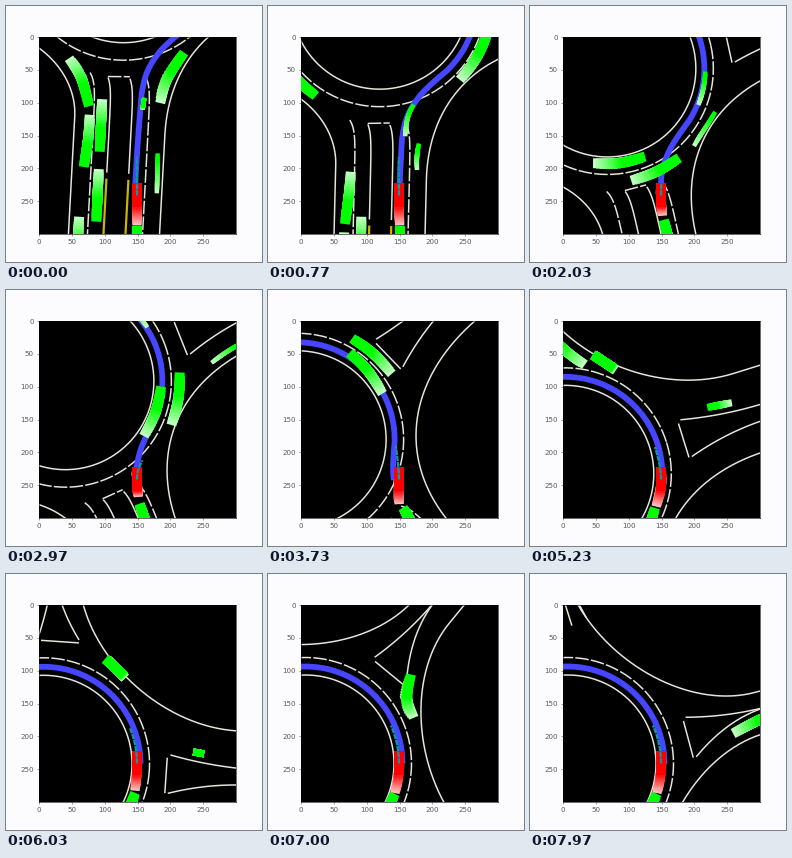
Animation, 256 px wide and 256 px high, one loop 8 s. Source, as a matplotlib script:

```python
import numpy as np
import matplotlib.pyplot as plt
from matplotlib.animation import FuncAnimation
from matplotlib.collections import PolyCollection

FRAMES, LOOP = 240, 8000
DT = LOOP / FRAMES / 1000
DPI = 51.2
PT = 72 / DPI                      # points per pixel
EGO = np.array([131.0, 189.5])     # fixed place of the red car, in pixels
AGES = np.arange(9, -1, -1) * DT   # ages of the ghosts in each trail
CAR, BIKE = (25, 10), (10, 4.5)
CLOCK = np.arange(-2, 9.5, 0.005)


# Geometry: the map is in pixels around the roundabout, south is +y.

def polar(deg, r):
    a = np.radians(deg)
    return np.stack([r * np.cos(a), r * np.sin(a)], -1)


def turn(p, deg):
    a = np.radians(deg)
    c, s = np.cos(a), np.sin(a)
    return np.stack([p[..., 0] * c - p[..., 1] * s,
                     p[..., 0] * s + p[..., 1] * c], -1)


def lengths(p):
    return np.r_[0, np.cumsum(np.hypot(*np.diff(p, axis=0).T))]


def smooth(*parts):
    """Cubic curve through the given points, sampled at each pixel."""
    p = np.vstack(parts).astype(float)
    d = lengths(p)
    slope = np.gradient(p, d, axis=0)
    s = np.arange(0, d[-1], 1.0)
    i = np.searchsorted(d, s, side="right") - 1
    h = (d[i + 1] - d[i])[:, None]
    u = (s - d[i])[:, None] / h
    return ((1 + 2 * u) * (1 - u) ** 2 * p[i] + u * (1 - u) ** 2 * h * slope[i]
            + u * u * (3 - 2 * u) * p[i + 1] + u * u * (u - 1) * h * slope[i + 1])


def ring(r, start, stop):
    return polar(np.arange(start, stop, -8), r)


def leave(deg):
    """Way out of the ring into the exit lane of an arm."""
    return polar(deg + np.array([20, 8, 2, 1]), np.array([119, 150, 200, 330]))


# Motion: a track gives the place, a speed profile gives the distance.

def travelled(times, speeds):
    return np.cumsum(np.interp(CLOCK, times, speeds)) * (CLOCK[1] - CLOCK[0])


def follow(track, s):
    d = lengths(track)

    def place(q):
        return np.stack([np.interp(q, d, track[:, k]) for k in (0, 1)], -1)
    s = np.clip(s, 5, d[-1] - 5)
    ahead = place(s + 4) - place(s - 4)
    return place(s), np.degrees(np.arctan2(ahead[..., 1], ahead[..., 0]))


def mover(track, spot, t0=0, times=(0,), speeds=(92,)):
    """Path of a vehicle that passes the spot at time t0."""
    run = travelled(times, speeds)
    nearest = np.argmin(np.hypot(*(track - spot).T))
    s0 = lengths(track)[nearest] - np.interp(t0, CLOCK, run)

    def path(t, lag=0):
        return follow(track, s0 + np.interp(t, CLOCK, run) - lag)
    return path


PACE = ((0, 1.25, 2, 3, 3.73, 4.47, 5.2, 6.03, 6.5),
        (60, 60, 20, 18, 50, 56, 51, 51, 60))
ego_path = mover(
    smooth([(35, 400), (26.4, 240), (24, 194), (25.6, 134), (33, 112),
            (46.5, 97.7), (70.2, 66.9)], polar(22, 96), ring(93.5, 0, -190)),
    (26.4, 240), 0, *PACE)


def follower(t):
    return ego_path(t, 34 + 0.15 * np.interp(t, *PACE))


south_out = smooth(ring(114, 200, 120), [(-38, 122), (-29, 145), (-30, 240),
                                         (-31, 420)])
south_mid = smooth([(-14, 60), (-12, 420)])
right_turn = smooth([(45, 430), (45, 202), (42, 146), (48, 124), (66, 97)],
                    polar(35, 116), leave(6))
right_lane = smooth([(47, 300), (45, 170), (49, 126), (59, 106)],
                    ring(112, 45, -140), leave(-170))
inner = smooth(ring(95, 260, 30), polar(-8, 99), polar(-45, 105), leave(-90))
outer = smooth(ring(114, 260, -45), polar(-58, 120), leave(-90))
bike_lane = smooth([(28, 300), (28, 147), (33, 110), (52, 84)],
                   ring(98, 40, -50), leave(-90))
east_in = smooth([(340, -6), (200, -16.5), (140, -23)])

TRAFFIC = [(mover(south_out, (-29, y)), CAR) for y in (141, 202, 305)]
TRAFFIC += [(mover(south_mid, (-12, y)), CAR) for y in (186, 256)]
TRAFFIC += [
    (mover(right_lane, (59, 106), speeds=(105,)), CAR),
    (mover(inner, polar(85, 95), 2.03, speeds=(93,)), CAR),
    (mover(outer, polar(68.5, 114), 2.03, (3.73, 4.47, 5, 6.03, 7.2),
           (95, 70, 8, 10, 90)), CAR),
    (mover(bike_lane, (28, 147), 0, (0, 0.6), (8, 81)), BIKE),
    (mover(right_turn, (45, 202), 0, (0, 0.77, 2.03, 2.6),
           (100, 45, 110, 90)), BIKE),
    (mover(east_in, (200, -16.5), 4.47, (4.9, 5.6), (60, 0)), (11, 7)),
    (follower, CAR),
]


# Road markings

WHITE, YELLOW = "#e6e6dc", "#c8b800"
SOLID, DASH = "-", (0, (9, 1.5))


def curb(p0, corner, p1, k):
    """Rounded corner between two arms, with straight ends."""
    p0, c, p1 = (np.array(p, float) for p in (p0, corner, p1))
    u = np.linspace(0, 1, 40)[:, None]
    q0, q1 = p0 + k * (c - p0), p1 + k * (c - p1)
    arc = ((1 - u) ** 3 * p0 + 3 * u * (1 - u) ** 2 * q0
           + 3 * u * u * (1 - u) * q1 + u ** 3 * p1)
    ends = [p + 150 * (p - c) / np.hypot(*(p - c)) for p in (p0, p1)]
    return np.vstack([ends[0], arc, ends[1]])


def splitter(deg, left, right, tips):
    """Island of an arm: a give-way line and two edges that close in."""
    u = np.linspace(0, 1, 20)
    edges = [np.stack([126 + 84 * u, tip + (y - tip) * (1 - u) ** 2], -1)
             for y, tip in zip((left, right), tips)]
    gate = np.array([(123, left + 3), (123, right)])
    return [turn(p, deg) for p in (gate, *edges)]


def lane_line(x, y0, y1):
    y = np.linspace(y0, y1, 60)
    return np.stack([x - 6 * np.exp((120 - y) / 9), y], -1)


LINES = [(polar(np.linspace(0, 360, 240), 88.5), WHITE, SOLID),
         (polar(np.linspace(0, 360, 240), 106), WHITE, DASH)]
solid = [
    curb((51, 178), (51, 30), (210, 38), 0.6),
    curb((190, -46), (22, -46), (22, -200), 0.5),
    curb((-20, -200), (-20, -46), (-190, -46), 0.5),
    curb((-100, 88), (-40, 110), (-40, 165), 0.6),
    *splitter(0, -17.5, 21, (-8.5, 7.5)),
    *splitter(-90, -14, 27, (-3, -3)),
    np.array([(-136, -56), (-165, -49)]), np.array([(-132, -40), (-180, -38)]),
]
LINES += [(p, WHITE, SOLID) for p in solid]
LINES += [(lane_line(x, 120, 330), WHITE, DASH) for x in (-21, 34)]
LINES += [(np.array([(-9, 123), (13, 122)]), WHITE, DASH)]
for x in (-5, 17):
    LINES += [(lane_line(x, 124, 219), WHITE, SOLID),
              (lane_line(x, 225, 330), YELLOW, SOLID)]
LINES += [(np.array([(218, y), (300, y)]), YELLOW, SOLID) for y in (-8, 7.5)]

ROUTE = smooth([(25, 340), (25, 160), (26, 135), (30, 116), (41, 96), (58, 78)],
               ring(97, 45, -250))


# Stage

GREY = "#5a5a5a"
fig = plt.figure(figsize=(5, 5), dpi=DPI, facecolor="#fcfcff")
ax = fig.add_subplot()
ax.set_facecolor("black")
ax.set_aspect("equal")
ax.set_xlim(-0.5, 299.5)
ax.set_ylim(299.5, -0.5)
ax.set_xticks(range(0, 300, 50))
ax.set_yticks(range(0, 300, 50))
ax.tick_params(color=GREY, labelcolor=GREY)


def stroke(color, px, style="-", z=2):
    return ax.plot([], [], color=color, lw=px * PT, ls=style, zorder=z,
                   solid_capstyle="butt", dash_capstyle="butt")[0]


def ghosts(rgb, count, z):
    tint = 0.75 * AGES[:, None] / AGES[0]
    colors = np.array(rgb) * (1 - tint) + tint
    group = PolyCollection([], zorder=z, linewidths=0,
                           facecolors=np.tile(colors, (count, 1)))
    ax.add_collection(group, autolim=False)
    return group


lines = [stroke(color, 1.5 if color == WHITE else 2.2, style)
         for _, color, style in LINES]
route = stroke("#4646ff", 5.8, z=3)
plan = stroke("#0f98a2", 2.2, (0, (2.4, 0.4)), z=6)
trails = ghosts((0, 1, 0), len(TRAFFIC), 4)
ego = ghosts((1, 0, 0), 1, 5)


def boxes(path, size, t):
    """Rectangles for the trail, oldest first."""
    pos, heading = path(t - AGES)
    corners = np.array([(-1, -1), (1, -1), (1, 1), (-1, 1)]) * np.array(size) / 2
    return pos[:, None] + turn(corners[None], heading[:, None])


def draw(i):
    t = i * DT
    here, heading = ego_path(t)

    def view(p):
        px = turn(p - here, -90 - heading) + EGO
        return (px - (32.64, 30.72)) * 300 / 197.12 - 0.5

    for line, (points, _, _) in zip(lines, LINES):
        line.set_data(*view(points).T)
    start = np.argmin(np.hypot(*(ROUTE - here).T))
    route.set_data(*view(ROUTE[start:start + 280]).T)
    plan.set_data(*view(ego_path(t + np.linspace(0, 0.65, 14))[0]).T)
    trails.set_verts(np.concatenate(
        [view(boxes(path, size, t)) for path, size in TRAFFIC]))
    ego.set_verts(view(boxes(ego_path, (24, 9.3), t)))
    return [*lines, route, trails, ego, plan]


def reset():
    return draw(0)


anim = FuncAnimation(fig, draw, frames=FRAMES, init_func=reset,
                     interval=LOOP / FRAMES, repeat=True, repeat_delay=0,
                     blit=False)
plt.show()
```
